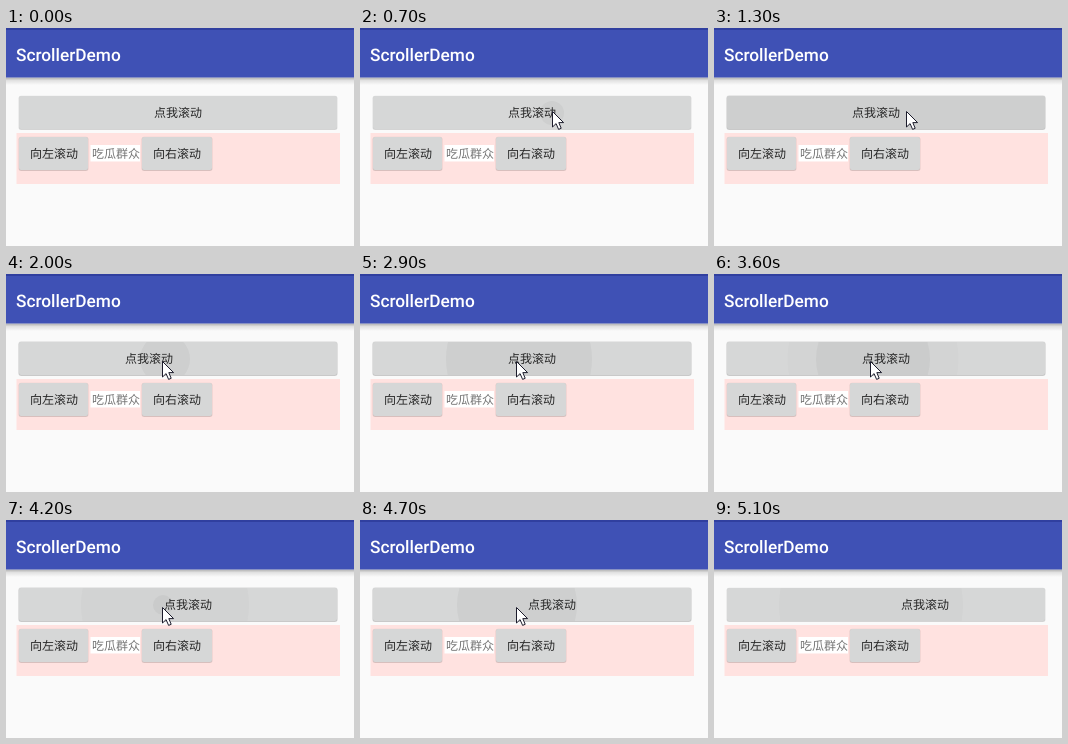
Write an HTML page that moves like this. It is 348 px wide and 218 px high and loops after 5700 ms.

```html
<!DOCTYPE html>
<html lang="zh">
<head>
<meta charset="utf-8">
<style>
  html, body { margin: 0; width: 100%; height: 100%; overflow: hidden; background: #fafafa; }
  svg { display: block; width: 348px; height: 218px; }
  text { font: 12px "Noto Sans CJK SC", "Noto Sans CJK", sans-serif; fill: #262626; text-rendering: geometricPrecision; }
  .title { font: 500 17.3px Roboto, sans-serif; fill: #fff; }
  .hint { fill: #757575; }
</style>
</head>
<body>
<svg viewBox="0 0 348 218">
  <defs>
    <linearGradient id="shade" x2="0" y2="1">
      <stop stop-color="#000" stop-opacity=".3"/>
      <stop offset=".4" stop-color="#000" stop-opacity=".1"/>
      <stop offset="1" stop-color="#000" stop-opacity="0"/>
    </linearGradient>
    <clipPath id="inside"><rect x="13" y="68" width="318" height="33" rx="2"/></clipPath>
  </defs>
  <rect width="348" height="218" fill="#fafafa"/>
  <rect y="49.5" width="348" height="7.5" fill="url(#shade)"/>
  <rect width="348" height="49.5" fill="#3f51b5"/>
  <rect width="348" height="2" fill="#303f9f"/>
  <text class="title" x="10" y="33">ScrollerDemo</text>

  <rect x="10.5" y="105" width="323.5" height="51" fill="#ffe2e0"/>
  <rect x="84.5" y="117" width="49.5" height="16.5" fill="#fff"/>
  <g id="buttons"></g>
  <g id="ripples" clip-path="url(#inside)"></g>
  <rect id="edge" x="12.5" y="67.5" width="319" height="34" rx="2.5" fill="none" stroke="#000" stroke-opacity=".05"/>

  <text id="label" y="88.5">点我滚动</text>
  <text x="24" y="129.5">向左滚动</text>
  <text class="hint" x="86" y="129.5">吃瓜群众</text>
  <text x="147" y="129.5">向右滚动</text>

  <path id="cursor" d="M.5 .5V16L4.1 12.6 6.6 18.4 9.2 17.3 6.8 11.6H11.6Z" fill="#fff" stroke="#1c1c2c" stroke-linejoin="round"/>
</svg>
<script>
const LOOP = 5700, TICK = 100, LAST = 5100;
const GROW = 400, FADE = 800, STEP = 9.75;
const $ = id => document.getElementById(id);
const mix = (a, b, p) => a + (b - a) * p;
const progress = (t, start, span) => Math.min(1, Math.max(0, (t - start) / span));

function add(parent, name, attrs) {
  const node = document.createElementNS(parent.namespaceURI, name);
  for (const key in attrs) node.setAttribute(key, attrs[key]);
  parent.append(node);
  return node;
}

function addButton(x, y, width) {
  const height = 33;
  add($('buttons'), 'rect', { x: x - .5, y: y - .3, width: width + 1, height: height + 1.3, rx: 2.5, opacity: .1 });
  add($('buttons'), 'rect', { x, y: y + .5, width, height, rx: 2, opacity: .12 });
  add($('buttons'), 'rect', { x, y, width, height, rx: 2, fill: '#d6d7d7' });
}
addButton(13, 68, 318);
addButton(13, 109, 69);
addButton(136, 109, 70);

// Each move shifts the label by one STEP.
const leftMoves = [1200, 1600, 2000];
const rightMoves = [2400, 2800, 2900, 3900, 4600, 4900, 5100];

const glides = [
  { at: 100, span: 400, x: 201, y: 80 },
  { at: 600, span: 100, x: 192, y: 83 },
  { at: 1300, span: 400, x: 156, y: 87 },
  { at: 4900, span: 100, x: 200, y: 33 }
];

// A ripple grows to its radius while held, then spreads wider and fades.
const ripples = [
  { x: 192, at: 700, release: 1200, from: 12, radius: 68, spread: 1200 },
  { x: 159, at: 2000, release: 3100, from: 25, radius: 73, spread: 20 },
  { x: 159, at: 3100, release: 3800, from: 10, radius: 57, spread: 54 },
  { x: 157, at: 4200, release: 4700, from: 10, radius: 60, spread: 64 }
];
for (const ripple of ripples) {
  ripple.node = add($('ripples'), 'circle', { cx: ripple.x, cy: 85 });
}

function draw(time) {
  const t = Math.min(LAST, Math.floor(time % LOOP / TICK) * TICK);

  const count = moves => moves.filter(at => at <= t).length;
  const offset = STEP * (count(rightMoves) - count(leftMoves));
  $('label').setAttribute('x', Math.round(148 + offset));

  let x = 319, y = 44;
  for (const glide of glides) {
    const p = progress(t, glide.at, glide.span);
    x = mix(x, glide.x, p);
    y = mix(y, glide.y, p);
  }
  $('cursor').setAttribute('transform', `translate(${Math.round(x)} ${Math.round(y)})`);
  $('cursor').style.display = t >= 100 && t < LAST ? '' : 'none';
  $('edge').style.display = t >= 1200 && t < 5000 ? '' : 'none';

  for (const { at, release, from, radius, spread, node } of ripples) {
    const grown = progress(t, at, GROW) ** 2;
    const faded = progress(t, release, FADE);
    node.setAttribute('r', mix(from, radius, grown) + spread * faded);
    node.setAttribute('opacity', t < at ? 0 : .04 * (1 - faded));
  }
}

const start = performance.now();
function frame() {
  draw(performance.now() - start);
  requestAnimationFrame(frame);
}
frame();
</script>
</body>
</html>
```
